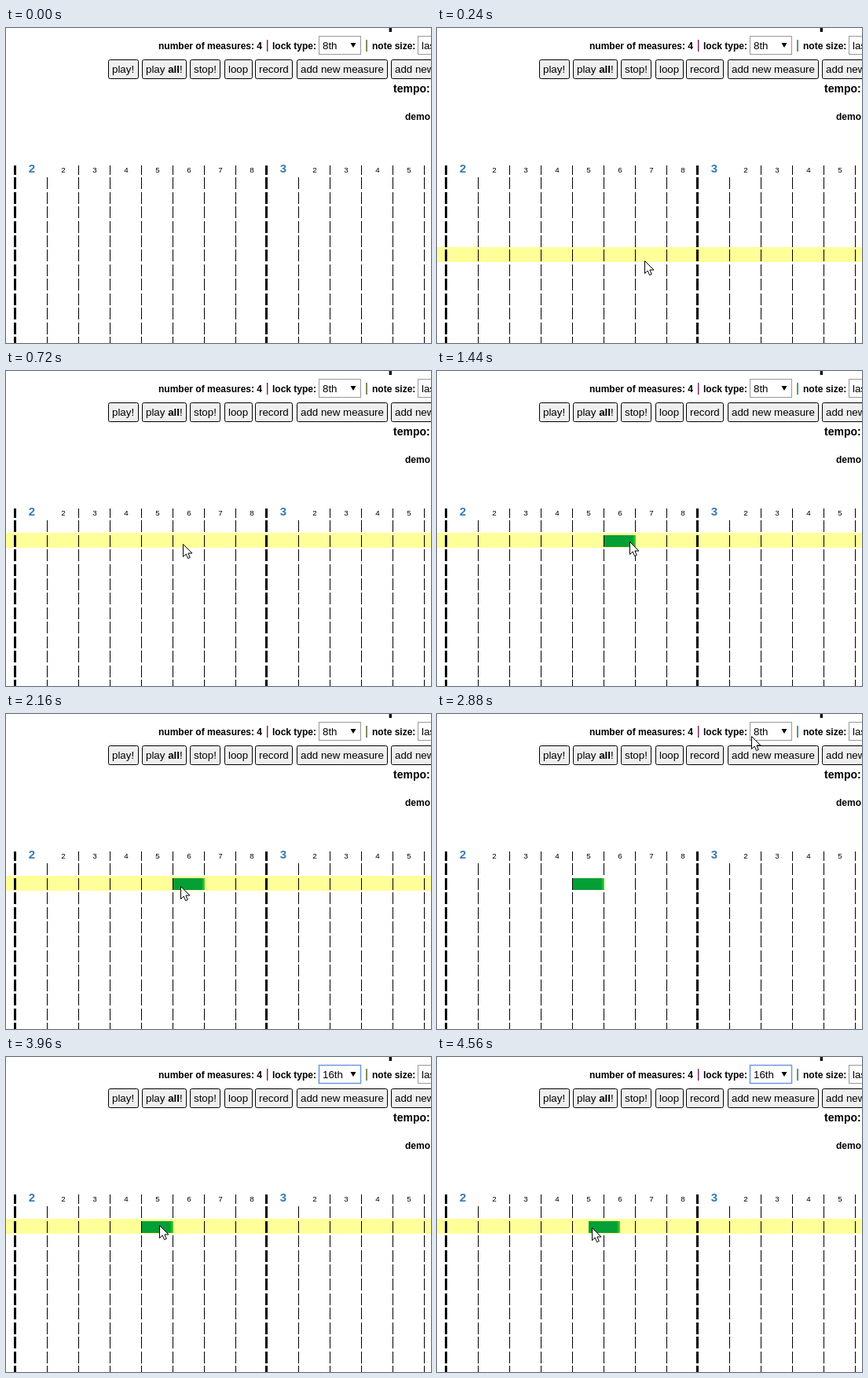
An HTML page that plays this animation: 541x401 px, repeating every 4800 ms.

```html
<!DOCTYPE html>
<html lang="en">
<head>
<meta charset="utf-8">
<title>Piano roll lock type</title>
<style>
  html, body { margin: 0; width: 100%; height: 100%; overflow: hidden; background: #fff; }
  svg { display: block; width: 541px; height: 401px; }
  text { font-family: "Liberation Sans", Arial, sans-serif; font-size: 13.333px; white-space: pre; }
  .label { font-size: 12px; font-weight: bold; }
  .small { font-size: 9.8px; text-anchor: middle; }
  .measure { font-size: 15px; font-weight: bold; text-anchor: middle; fill: #337ab7; }
  .bold { font-weight: bold; }
</style>
</head>
<body>
<svg id="stage" viewBox="0 0 541 401"></svg>
<script>
const STEP = 120, LOOP = 4800;
const LEFT = 12, CELL = 40, TOP = 190.2, ROW = 18.45;
const stage = document.getElementById('stage');

function add(tag, attrs, parent = stage) {
  const el = document.createElementNS('http://www.w3.org/2000/svg', tag);
  for (const key in attrs) el.setAttribute(key, attrs[key]);
  parent.appendChild(el);
  return el;
}
const rect = (x, y, width, height, fill, parent) =>
  add('rect', { x, y, width, height, fill }, parent);
const box = (x, y, w, h, fill, stroke, rx = 0, parent) =>
  add('rect', { x: x + .5, y: y + .5, width: w - 1, height: h - 1, fill, stroke, rx }, parent);
function text(x, y, str, cls = '', parent) {
  const el = add('text', { x, y, class: cls }, parent);
  el.textContent = str;
  return el;
}
const show = (el, on) => el.setAttribute('visibility', on ? 'visible' : 'hidden');
const rowY = k => Math.round(TOP + ROW * k);

function pipe(x, left, right) {
  rect(x, 15, 1, 15, left);
  rect(x + 1, 15, 1, 15, right);
}

// A word between asterisks is bold
function button(x, str) {
  const frame = box(x, 40, 20, 25, '#efefef', '#000', 2);
  const label = text(x + 5, 57, '');
  str.split('*').forEach((part, i) => {
    add('tspan', { class: i % 2 ? 'bold' : '' }, label).textContent = part;
  });
  frame.setAttribute('width', Math.round(label.getComputedTextLength() + 9.4));
}

// Toolbar
text(486, 0, 'p', 'bold').style.fontSize = '24px';
text(194, 27, 'number of measures: 4', 'label');
pipe(332, '#7d1a5a', '#d9a0c8');
text(339, 27, 'lock type:', 'label');
const lock = box(398, 10, 54, 24, '#fff', '#999');
const lockText = text(403, 27, '');
add('path', { d: 'M438.5 19h7l-3.5 6z' });
pipe(458, '#bd8a10', '#3c8fc8');
text(466, 27, 'note size:', 'label');
box(524, 10, 60, 24, '#fff', '#999');
text(529, 27, 'last');

button(130, 'play!');
button(173, 'play *all*!');
button(234, 'stop!');
button(278, 'loop');
button(317, 'record');
button(370, 'add new measure');
button(490, 'add new note');
text(493, 82, 'tempo:', 'bold').style.fontSize = '14px';
text(508, 117, 'demo', 'label');

// Grid
const band = rect(0, 0, 541, 19, '#ffff99');
for (let i = 0; i < 14; i++) {
  const beat = i % 8, x = LEFT + i * CELL;
  const [left, width] = beat ? [x, 1] : [x - 2, 3];
  if (beat !== 1) rect(left, 175, width, 12, '#000');
  for (let k = 0; k < 12; k++) rect(left, rowY(k), width, 15, '#000');
  if (beat) text(x + 21, 184, beat + 1, 'small');
  else text(x + 21, 184, 2 + i / 8, 'measure');
}

// Note with its resize edge
const fade = add('linearGradient', { id: 'edge' }, add('defs', {}));
add('stop', { offset: 0, 'stop-color': '#04a035' }, fade);
add('stop', { offset: 1, 'stop-color': '#50dc10' }, fade);
const note = add('g', {});
rect(0, rowY(1), CELL, 15, '#04a035', note);
rect(CELL - 4, rowY(1), 4, 15, 'url(#edge)', note);

// Drop-down list
const list = add('g', {});
box(398, 34, 54, 52, '#fff', '#7f9db9', 0, list);
const pick = rect(399, 0, 52, 16, '#1e90ff', list);
const optionY = i => 47 + Math.round(i * 16.5);
const options = ['8th', '16th', '32nd'].map((s, i) => text(403, optionY(i), s, '', list));

const cursor = add('path', {
  d: 'M.5 .5V16.5L4.2 13L6.6 18.6L9.3 17.4L6.9 12H12Z', fill: '#fff', stroke: '#000'
});

// Pointer stops: [step, x, y]
const stops = [
  [1, 270, 318], [4, 253, 252], [6, 225, 220],   // come in
  [10, 228, 217], [15, 270, 217], [20, 190, 220], // add a note and drag it
  [22, 200, 214], [24, 400, 28], [27, 444, 22],   // up to the list
  [29, 432, 64], [31, 252, 178],                  // choose and return
  [32, 200, 212], [35, 184, 217], [38, 197, 217]  // drag again
];
const ADDED = 8, DROPPED = 20, OPENED = 27, HOVERED = 29, CHOSEN = 30;

function pointer(step) {
  const next = stops.findIndex(s => s[0] > step);
  if (next < 0) return stops[stops.length - 1].slice(1);
  if (!next) return [0, 0];
  const a = stops[next - 1], b = stops[next];
  const part = (step - a[0]) / (b[0] - a[0]);
  return [1, 2].map(i => Math.round(a[i] + (b[i] - a[i]) * part));
}

function noteX(step) {
  const again = step > CHOSEN + 5;
  const snap = again ? CELL / 2 : CELL;
  const [x] = pointer(again ? step : Math.min(step, DROPPED));
  return LEFT + 1 + Math.floor((x - LEFT - 1) / snap) * snap;
}

function draw(time) {
  const step = Math.floor(time % LOOP / STEP);
  const [x, y] = pointer(step);

  show(cursor, step > 0);
  cursor.setAttribute('transform', `translate(${x} ${y})`);

  show(band, y > 188);
  band.setAttribute('y', rowY(Math.floor((y - 188) / ROW)) - 3);

  show(note, step >= ADDED);
  note.setAttribute('transform', `translate(${noteX(step)} 0)`);

  const chosen = +(step >= HOVERED), focus = step >= OPENED;
  show(list, focus && step < CHOSEN);
  pick.setAttribute('y', optionY(chosen) - 12);
  options.forEach((el, i) => el.setAttribute('fill', i === chosen ? '#fff' : '#000'));
  lockText.textContent = step >= CHOSEN ? '16th' : '8th';
  lock.setAttribute('stroke', focus ? '#6b98e0' : '#999');
  lock.setAttribute('stroke-width', focus ? 1.5 : 1);
}

const start = performance.now();
function tick() {
  draw(performance.now() - start);
  requestAnimationFrame(tick);
}
tick();
</script>
</body>
</html>
```
